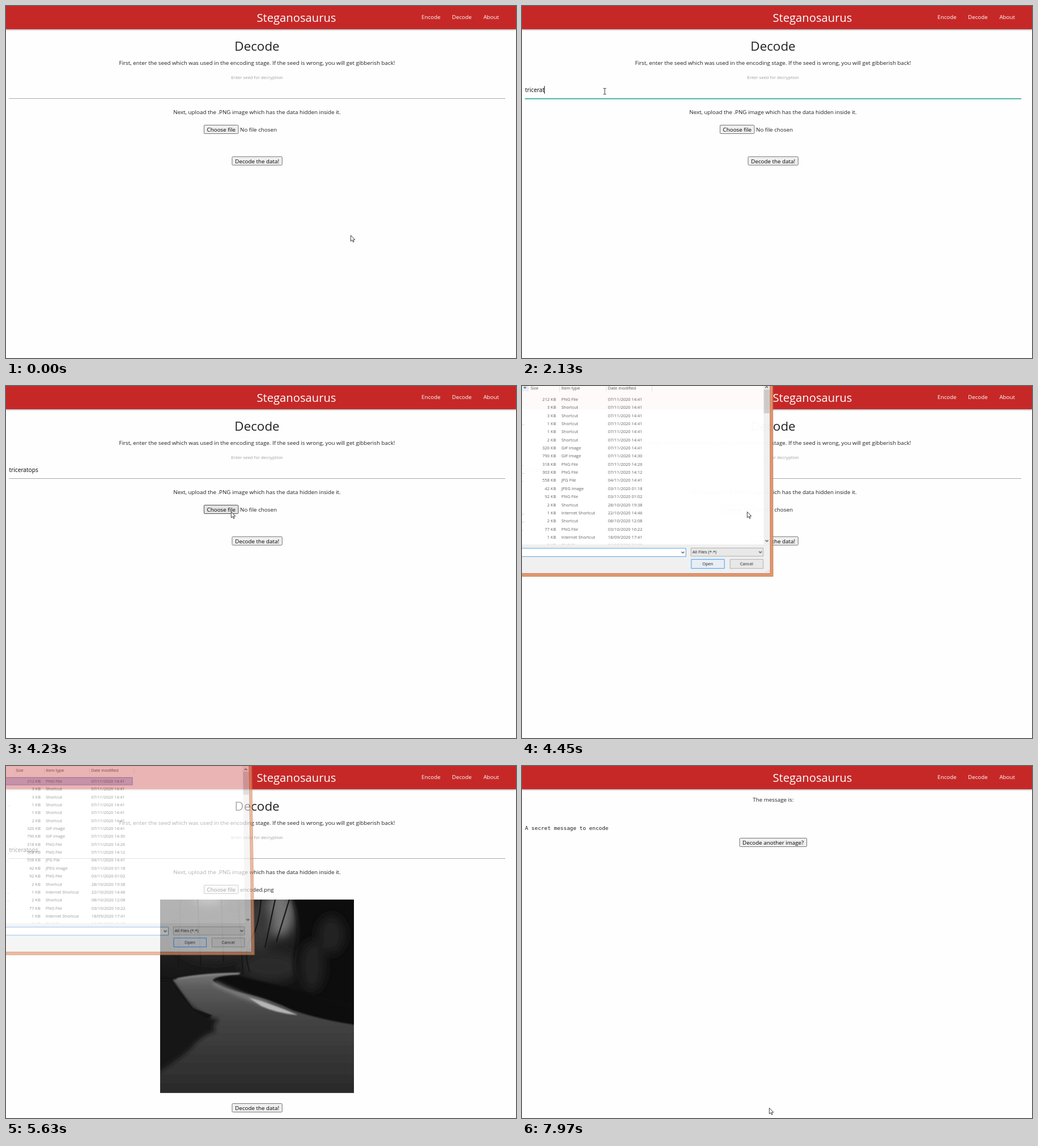
Animation of 900x622 px, one loop 8000 ms. Source, as an HTML page:

```html
<!DOCTYPE html>
<html lang="en">
<head>
<meta charset="utf-8">
<title>Decode</title>
<style>
  html, body { margin: 0; width: 100%; height: 100%; overflow: hidden; background: #fefefe; }
  svg { position: absolute; left: 0; top: 0; width: 900px; height: 622px; overflow: visible; }
  text { font: 9.8px "Open Sans", "Noto Sans", sans-serif; fill: #212121; white-space: pre; }
  .mid { text-anchor: middle; }
  .nav text { fill: #fff; }
  .bar { fill: #c62828; filter: drop-shadow(0 1px 1.5px rgba(0, 0, 0, .4)); }
  .button rect { fill: #efefef; stroke: #767676; }
  .button text { fill: #000; }
  .button.hover rect { fill: #e3e3e3; stroke: #505050; }
  .button.active rect { fill: #f5f5f5; stroke: #8d8d8d; }
  #dialog { transform-origin: 100px 150px; }
  #dialog text { font-size: 7.5px; fill: #111; }
  #dialog .list text { fill: #5c5c5c; }
  #dialog .list .more { fill: #4a90c8; }
  #dialog .head text { fill: #4a4a4a; }
  .right { text-anchor: end; }
  .chevron { fill: none; stroke: #444; stroke-width: 1.2; }
</style>
</head>
<body>
<svg viewBox="0 0 900 622">
  <defs>
    <linearGradient id="forest" x2="0" y2="1">
      <stop offset="0" stop-color="#262626"/><stop offset=".3" stop-color="#1c1c1c"/><stop offset=".5" stop-color="#101010"/>
    </linearGradient>
    <linearGradient id="asphalt" x2="0" y2="1">
      <stop offset="0" stop-color="#777"/><stop offset=".12" stop-color="#5c5c5c"/>
      <stop offset=".35" stop-color="#454545"/><stop offset=".65" stop-color="#373737"/><stop offset="1" stop-color="#282828"/>
    </linearGradient>
    <filter id="soft" x="-50%" y="-50%" width="200%" height="200%"><feGaussianBlur stdDeviation="9"/></filter>
    <filter id="edge" x="-20%" y="-20%" width="140%" height="140%"><feGaussianBlur stdDeviation="3.5"/></filter>
    <filter id="fine" x="-20%" y="-20%" width="140%" height="140%"><feGaussianBlur stdDeviation="1.2"/></filter>
    <clipPath id="photoFrame"><path d="M0 0H342V341.5H0Z"/></clipPath>
  </defs>

  <g id="form">
    <text class="mid" x="443" y="79" style="font-size:22.4px">Decode</text>
    <text class="mid" x="443" y="104">First, enter the seed which was used in the encoding stage. If the seed is wrong, you will get gibberish back!</text>
    <text class="mid" x="443" y="129" style="font-size:7.75px;fill:#9e9e9e">Enter seed for decryption</text>
    <text id="seed" x="5.5" y="152.3" style="font-size:10.2px;fill:#000"></text>
    <path id="caret" d="M0 141.5V155" stroke="#000"/>
    <path d="M5 163.5H881" stroke="#a8a8a8"/>
    <path id="focusLine" d="M5 163.8H881" stroke="#37ada2" stroke-width="1.7"/>
    <text class="mid" x="443" y="191.3">Next, upload the .PNG image which has the data hidden inside it.</text>
    <g id="choose" class="button">
      <rect x="349.5" y="210.5" width="60.5" height="15" rx="1.5"/>
      <text class="mid" x="379.8" y="221.5">Choose file</text>
    </g>
    <text id="fileName" x="413" y="221.5"></text>

    <g id="photo" transform="translate(272 236)" clip-path="url(#photoFrame)">
      <path fill="url(#forest)" d="M0 0H342V342H0Z"/>
      <g filter="url(#soft)">
        <ellipse cx="212" cy="24" rx="24" ry="42" fill="#757575"/>
        <ellipse cx="85" cy="-2" rx="26" ry="9" fill="#777"/>
        <ellipse cx="175" cy="45" rx="25" ry="45" fill="#383838"/>
        <ellipse cx="95" cy="70" rx="70" ry="40" fill="#252525"/>
        <ellipse cx="195" cy="118" rx="52" ry="26" fill="#2c2c2c"/>
      </g>
      <path fill="none" stroke="#171717" stroke-width="2.2" d="M146 132L138 0M158 128Q146 90 160 70T178 0M185 85L203 0M205 75L228 0M112 110L108 0M72 118L66 0M32 120L36 0"/>
      <path fill="#0b0b0b" filter="url(#edge)" d="M230 -9Q250 40 238 95Q232 150 270 172L355 195V-9Z"/>
      <g filter="url(#soft)" fill="#232323">
        <ellipse cx="268" cy="118" rx="22" ry="45"/><ellipse cx="302" cy="62" rx="24" ry="34"/>
      </g>
      <path fill="#0d0d0d" filter="url(#fine)" d="M90 142Q115 130 150 138T260 165L346 192V225L235 198Z"/>
      <path fill="url(#asphalt)" filter="url(#fine)" d="M22 142Q60 130 141 129V132Q94 135 93 143Q105 156 150 166T235 196Q285 213 348 222V348H-6V290L92 205L58 192Q38 165 22 142Z"/>
      <path fill="#121212" filter="url(#edge)" d="M-15 141L21 144Q36 168 54 187Q76 208 104 212Q88 222 98 232Q70 242 55 262Q35 282 -15 312Z"/>
      <path fill="none" stroke="#8c8c8c" stroke-width="3" opacity=".65" filter="url(#fine)" d="M30 140Q80 132 138 131"/>
      <path fill="none" stroke="#959595" stroke-width="7" opacity=".7" filter="url(#edge)" d="M95 147Q135 167 190 186"/>
      <path fill="#b5b5b5" filter="url(#fine)" d="M156 173Q195 183 243 204Q205 201 178 188Z"/>
    </g>

    <g id="decode" class="button">
      <rect x="399" y="266.2" width="88.3" height="15" rx="1.5"/>
      <text class="mid" x="443.2" y="277.5">Decode the data!</text>
    </g>
  </g>

  <g id="result">
    <text class="mid" x="443.3" y="63">The message is:</text>
    <text x="5.3" y="113" style="font:9.42px 'DejaVu Sans Mono',monospace">A secret message to encode</text>
    <g class="button">
      <rect x="384" y="127.5" width="118.5" height="15" rx="1.5"/>
      <text class="mid" x="443.2" y="138.8">Decode another image?</text>
    </g>
  </g>

  <g class="nav">
    <path class="bar" d="M0 -9H900V41H0Z"/>
    <text x="442.5" y="28" style="font-size:20.2px">Steganosaurus</text>
    <text x="733.2" y="23.3">Encode</text>
    <text x="787" y="23.3">Decode</text>
    <text x="842.4" y="23.3">About</text>
  </g>
</svg>

<svg id="dialog" viewBox="0 0 900 622">
  <clipPath id="listArea"><path d="M-40 -40H438V279.5H-40Z"/></clipPath>
  <path fill="#e5946a" d="M-40 -40H443.5V337H-40Z"/>
  <path fill="none" stroke="#b9744f" d="M443 -40V336.5H-40M438.5 -40V331.5H-40"/>
  <path fill="#fff" d="M-40 -40H438V280H-40Z"/>
  <path fill="#f0f0f0" d="M-40 280H438V331H-40ZM427 -40H438V280H427Z"/>
  <path fill="#cdcdcd" d="M427.5 6H437.5V48H427.5Z"/>
  <path class="chevron" d="M430 3L432.5 .5L435 3M430 272.5L432.5 275L435 272.5"/>
  <g class="head">
    <path stroke="#e6e6e6" d="M66.5 0V9M148.5 0V9M229.5 0V9"/>
    <g id="headHover"><path fill="#eaf5fc" d="M-9 -9H10V9H-9Z"/><path stroke="#cde4f2" d="M10.5 0V9"/><path fill="#555" d="M2 1.5H8L5 4.5Z"/></g>
    <text x="15" y="6">Size</text><text x="69.5" y="6">Item type</text><text x="151.8" y="6">Date modified</text>
  </g>
  <g class="list" clip-path="url(#listArea)">
    <rect id="row" x="-40" y="16.5" width="266.5" height="13.5"/>
    <g id="rows"></g>
  </g>
  <path fill="#fff" stroke="#569de5" d="M-40 287H289.5V301.5H-40Z"/>
  <path fill="#e8e8e8" stroke="#acacac" d="M298.5 286.5H426V301H298.5ZM367.5 306.5H426V322.5H367.5Z"/>
  <path fill="#e8eef4" stroke="#3399ff" d="M299 306.5H357.5V322.5H299Z"/>
  <path class="chevron" d="M281.5 293L284 295.5L286.5 293M418.5 292.5L421 295L423.5 292.5"/>
  <path stroke="#b5b5b5" stroke-dasharray="1.2 1.3" d="M435.5 325V330M433 327.5V330M430.5 329V330"/>
  <text x="301" y="296.5">All Files (*.*)</text>
  <text class="mid" x="328" y="317">Open</text>
  <text class="mid" x="396.7" y="317">Cancel</text>
</svg>

<svg viewBox="0 0 900 622">
  <path id="arrow" fill="#fff" stroke="#111" stroke-width=".8" d="M.4 .3V10.8L2.9 8.6L4.6 12.3L6.1 11.6L4.5 8H7.8Z"/>
  <path id="beam" fill="none" stroke="#333" d="M.5 .5H2.3L3 1L3.7 .5H5.5M3 1V10.5M.5 11H2.3L3 10.5L3.7 11H5.5"/>
</svg>

<script>
const LOOP = 8000;
const el = id => document.getElementById(id);
const show = (id, on) => { el(id).style.visibility = on ? 'visible' : 'hidden'; };
const clamp = v => Math.min(1, Math.max(0, v));
const ramp = (t, from, to) => clamp((t - from) / (to - from));

const files = [
  '212|PNG File|07/11/2020 14:41', '3|Shortcut|07/11/2020 14:41', '3|Shortcut|07/11/2020 14:41',
  '1|Shortcut|07/11/2020 14:41|..', '1|Shortcut|07/11/2020 14:41', '2|Shortcut|07/11/2020 14:41',
  '320|GIF image|07/11/2020 14:41', '790|GIF image|07/11/2020 14:30', '318|PNG File|07/11/2020 14:26|.',
  '303|PNG File|07/11/2020 14:12|..', '558|JPG File|04/11/2020 14:41|.', '42|JPEG image|03/11/2020 01:18',
  '92|PNG File|03/11/2020 01:02', '2|Shortcut|28/10/2020 19:38', '1|Internet Shortcut|22/10/2020 14:46|..',
  '2|Shortcut|08/10/2020 12:08|..', '77|PNG File|03/10/2020 16:22|.', '1|Internet Shortcut|18/09/2020 17:41',
  '2|PNG File|14/09/2020 15:38'
];
el('rows').innerHTML = files.map((file, i) => {
  const [size, type, date, more = ''] = file.split('|');
  const y = 25.8 + i * 14.37;
  return `<text class="more" x="0" y="${y}">${more}</text><text class="right" x="60" y="${y}">${size} KB</text>` +
    `<text x="69.5" y="${y}">${type}</text><text x="151.8" y="${y}">${date}</text>`;
}).join('');

const seed = 'triceratops';
const keyTimes = [1130, 1210, 1370, 1520, 1670, 1900, 1980, 2130, 2360, 2440, 2670];

// Pointer path: time, x, y
const path = [
  [0, 608, 405], [60, 608, 405], [250, 420, 290], [450, 200, 175], [670, 143, 145],
  [3200, 143, 145], [3500, 360, 237], [3600, 388, 220], [3900, 397, 222],
  [4500, 397, 222], [4840, -30, 0], [6110, -30, 0], [6180, 16, 80],
  [6440, 205, 325], [6720, 361, 522], [6970, 420, 584], [7340, 436, 604], [LOOP, 436, 604]
];

function pointer(t) {
  const i = path.findIndex(p => p[0] > t);
  const [t0, x0, y0] = path[i - 1], [t1, x1, y1] = path[i];
  const k = ramp(t, t0, t1);
  return [x0 + (x1 - x0) * k, y0 + (y1 - y0) * k];
}

function drawForm(t) {
  const text = el('seed');
  text.textContent = seed.slice(0, keyTimes.filter(k => k <= t).length);
  const caretX = 5.5 + (text.textContent ? text.getComputedTextLength() : 0);
  el('caret').setAttribute('transform', `translate(${caretX})`);
  show('caret', (t >= 480 && t < 980) || (t >= 1130 && t < 3220));
  el('focusLine').style.opacity = ramp(t, 450, 670) - ramp(t, 3600, 3900);

  const loaded = t >= 5550;
  el('fileName').textContent = loaded ? 'encoded.png' : 'No file chosen';
  el('photo').style.display = loaded ? '' : 'none';
  el('decode').setAttribute('transform', `translate(0 ${loaded ? 330.3 : 0})`);
  el('choose').classList.toggle('hover', t >= 3570 && t < 4500);
  el('decode').classList.toggle('hover', t >= 7110);
  el('decode').classList.toggle('active', t >= 7660);
}

function drawDialog(t) {
  const dialog = el('dialog');
  dialog.style.display = t >= 4290 && t < 5710 ? '' : 'none';
  const closing = t < 5550 ? 0 : Math.floor((t - 5550) / 80) / 2;
  const away = (1 - ramp(t, 4250, 4500)) ** 2 + closing;
  dialog.style.opacity = 1 - .7 * away;
  dialog.style.transform = away ? `perspective(1000px) rotateX(${5 * away}deg) scale(${1 - .044 * away})` : 'none';

  show('headHover', t < 5080);
  show('row', t >= 5080);
  el('row').style.fill = t < 5330 ? '#e5f3fb' : '#c4cbee';
  el('row').style.stroke = t < 5330 ? '#70c0e7' : '#7c8fc8';
}

function draw(t) {
  const done = t >= 7970;
  el('form').style.display = done ? 'none' : '';
  el('result').style.display = done ? '' : 'none';
  if (!done) drawForm(t);
  drawDialog(t);

  const [x, y] = pointer(Math.floor(t / 70) * 70);
  const overInput = t < 4000 && y > 132 && y < 164;
  for (const id of ['arrow', 'beam']) {
    el(id).setAttribute('transform', `translate(${x} ${y})`);
    show(id, (id === 'beam') === overInput);
  }
}

const start = performance.now();
function tick() {
  draw((performance.now() - start) % LOOP);
  requestAnimationFrame(tick);
}
tick();
</script>
</body>
</html>
```
